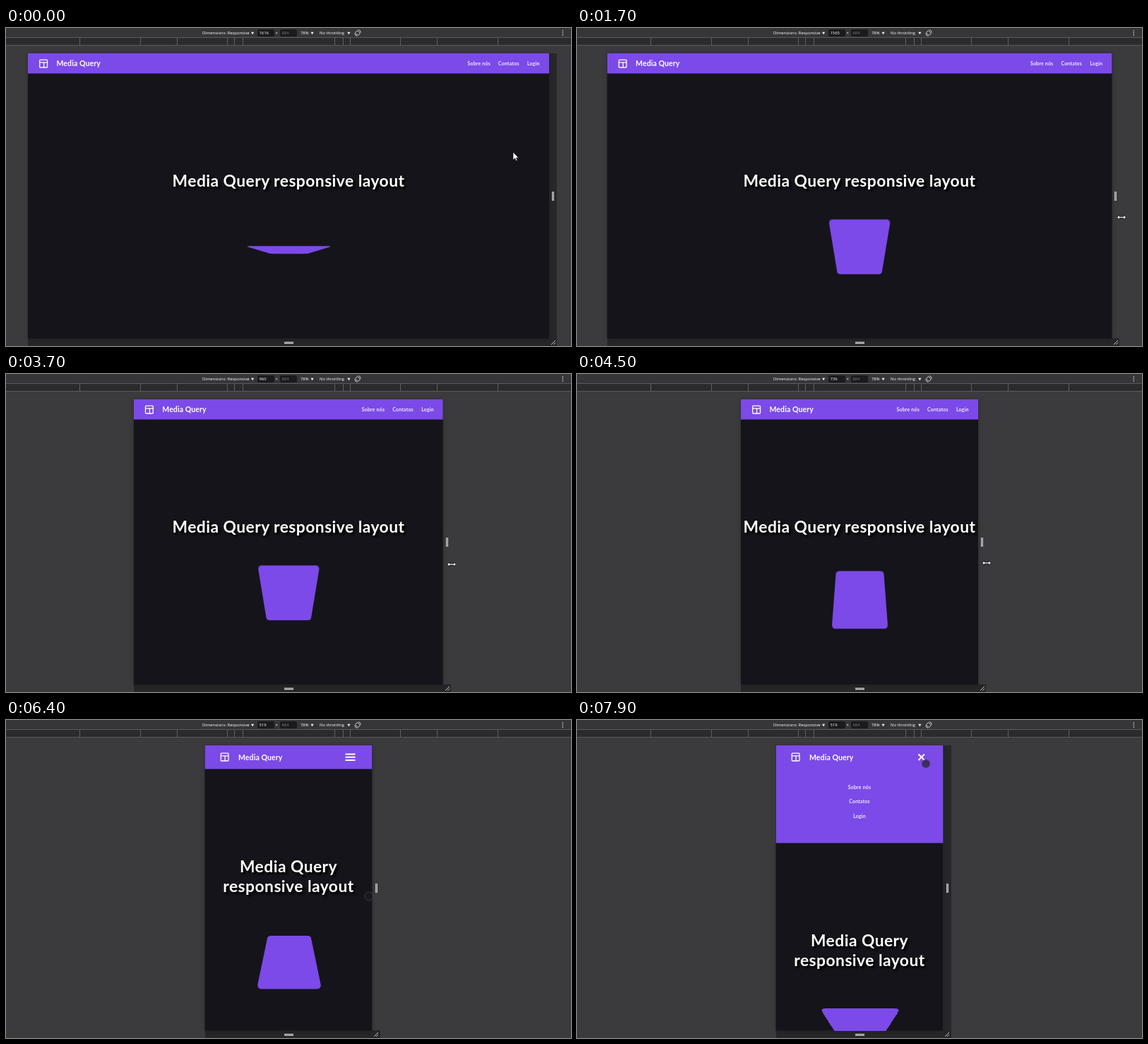
Write an HTML page that moves like this. It is 800 by 451 pixels and loops after 8000 ms.

```html
<!DOCTYPE html>
<html lang="en">
<head>
<meta charset="utf-8">
<title>Responsive layout</title>
<style>
html, body { margin: 0; width: 100%; height: 100%; overflow: hidden; background: #3b3b3d; }
#stage { position: relative; width: 800px; height: 451px; overflow: hidden; color: #fff; font-family: Lato, sans-serif; }
#stage * { position: absolute; box-sizing: border-box; white-space: nowrap; }
#stage br { position: static; }
svg { overflow: visible; }
.bar { left: 0; top: 0; width: 800px; height: 14px; background: #363638; border-bottom: 1px solid #5a5a5d;
  font: 500 5.9px/14px "Open Sans", sans-serif; }
.box { top: 2px; width: 24px; height: 10px; border-radius: 2px; background: #1a1a1c; line-height: 10px; padding-left: 2.5px; }
.presets { left: 0; top: 14px; width: 800px; height: 11px; background: #2b2b2d; border-bottom: 1px solid #5a5a5d; }
.presets i { top: 0; width: 1px; height: 10px; background: #606063; }
#page { left: 0; top: 0; height: 405px; overflow: hidden; background: #15141a; }
#shade { left: 0; top: 0; height: 405px; box-shadow: 0 0 6px rgba(0,0,0,.22); }
#head { left: 0; top: 0; width: 100%; background: #7c4ae8; }
#name { font-weight: 700; font-size: 10.5px; letter-spacing: .1px; line-height: 14px; }
.link { font-size: 7px; font-weight: 600; letter-spacing: .2px; line-height: 10px; }
h1 { margin: 0; left: 50%; transform: translate(-50%, -50%); text-align: center; font-weight: 700;
  font-size: 22.8px; letter-spacing: .46px; line-height: 27.5px; text-shadow: 3px 3px 3px #000; }
#plane { left: 50%; width: 73px; height: 83px; margin: -41.5px 0 0 -36px; border-radius: 4.8px; background: #7c4ae8; }
#bottom { top: 440px; height: 11px; background: #262628; }
#side { top: 36px; width: 11px; height: 404px; }
#grip { top: 232px; width: 3px; height: 13px; background: #77777a; border: solid #c8c8ca; border-width: 0 1px; }
#hgrip { left: 394px; top: 445px; width: 13px; height: 3px; background: #77777a; border: solid #c8c8ca; border-width: 1px 0; }
</style>
</head>
<body>
<div id="stage">
  <div class="bar">
    <span style="left:278px">Dimensions: Responsive</span>
    <span class="box" id="size" style="left:356px"></span>
    <span style="left:381.5px">×</span>
    <span class="box" style="left:388px;color:#77777a">884</span>
    <span style="left:417px">78%</span>
    <span style="left:444px">No throttling</span>
    <svg width="800" height="14" fill="#f0f0f2">
      <path d="M347 5.8h4.2l-2.1 3.4zM431.5 5.8h4.2l-2.1 3.4zM483.3 5.8h4.2l-2.1 3.4z"/>
      <g fill="none" stroke="#e0e0e2" stroke-width=".9">
        <rect x="495.6" y="4.2" width="4.6" height="5.6" rx=".8" transform="rotate(-45 498 7)"/>
        <path d="M493.8 7.5a4.4 4.4 0 0 0 3.6 4M502.3 6.5a4.4 4.4 0 0 0 -3.6 -4"/>
      </g>
      <circle cx="788.3" cy="4" r=".8"/><circle cx="788.3" cy="7" r=".8"/><circle cx="788.3" cy="10" r=".8"/>
    </svg>
  </div>
  <div class="presets" id="presets"></div>
  <div id="bottom"></div>
  <div id="side"></div>
  <div id="shade"></div>
  <div id="page">
    <div id="head">
      <svg id="icon" width="12" height="12" fill="none" stroke="#fff" stroke-width="1.3">
        <rect x=".7" y=".7" width="10.8" height="10.8" rx="1"/><path d="M.7 4.3h10.8M6.6 4.3v7"/>
      </svg>
      <span id="name">Media Query</span>
      <span class="link">Sobre nós</span>
      <span class="link">Contatos</span>
      <span class="link">Login</span>
      <svg id="toggle" width="14" height="11" style="top:11.5px" fill="none" stroke="#fff" stroke-width="2"><path/></svg>
    </div>
    <h1></h1>
    <div id="plane"></div>
  </div>
  <div id="grip"></div>
  <div id="hgrip"></div>
  <svg id="corner" width="8" height="8" style="top:442px" stroke="#c4c4c6"><path d="M1 7L7 1M4.2 7L7 4.2"/></svg>
  <svg id="cursor" width="1" height="1">
    <path d="M0 -1V10.2L2.6 7.8L4.3 11.4L6 10.6L4.4 7.2H7.8Z" fill="#fff" stroke="#000" stroke-width=".6"/>
    <path d="M-6.3 0L-3 -3.1V-1H3V-3.1L6.3 0L3 3.1V1H-3V3.1Z" fill="#fff" stroke="#000" stroke-width=".7"/>
    <circle r="6" fill="rgba(28,28,30,.65)" stroke="rgba(100,100,104,.5)"/>
  </svg>
</div>
<script>
const $ = q => document.querySelector(q);
const px = v => v + 'px';
const place = (el, left, width) => {
  el.style.left = px(left);
  if (width !== undefined) el.style.width = px(width);
};
const links = document.querySelectorAll('.link'), pointers = $('#cursor').children;
const LOOP = 8000, SCALE = .22835;   // half a CSS pixel on the stage

// rows: time, value...
const HALF = [[0, 369], [1300, 369], [1700, 357.4], [1800, 354], [2600, 294.1], [2700, 288], [3600, 224],
  [3700, 219.2], [4500, 168], [5200, 140], [5450, 140], [6300, 118.5]];
const CURSOR = [[0, 718, 177], [300, 718, 177], [1000, 782, 266], [1300, 782.5, 268], [1700, 771, 268.5],
  [2600, 706, 271.5], [3700, 631, 270], [4500, 580, 268], [5300, 556.5, 266], [5450, 556.5, 266],
  [6300, 535, 262], [6400, 514, 250], [7100, 494, 62]];

function at(rows, t) {
  const i = rows.findIndex(r => r[0] > t);
  if (i < 0) return rows[rows.length - 1].slice(1);
  const a = rows[i - 1], b = rows[i], k = (t - a[0]) / (b[0] - a[0]);
  return a.slice(1).map((v, j) => v + (b[j + 1] - v) * k);
}

for (const d of [65, 77, 87, 158, 210, 296])
  for (const x of [400 - d, 400 + d]) {
    const line = document.createElement('i');
    place(line, x);
    $('#presets').append(line);
  }

function drawPage(half, open) {
  const mobile = half < 600 * SCALE, wrapped = half < 166;
  const shift = (mobile ? 5.25 : 0) + (open ? 104.7 : 0);
  const mid = mobile ? 17 : 14.5;
  for (const el of [$('#page'), $('#shade')]) {
    el.style.width = px(half * 2);
    el.style.transform = `translate(${400 - half}px, 35.5px)`;
  }
  $('#head').style.height = px(open ? 139 : mobile ? 34 : 29);
  place($('#icon'), mobile ? 21.8 : 15.5);
  $('#icon').style.top = px(mid - 6);
  place($('#name'), mobile ? 47.5 : 40.5);
  $('#name').style.top = px(mid - 7.2);
  links.forEach((el, i) => {
    el.style.display = mobile && !open ? 'none' : '';
    el.style.left = px(open ? half : half * 2 - [115.5, 72, 31][i]);
    el.style.top = px(open ? 54 + 20.3 * i : 9.3);
    el.style.transform = open ? 'translateX(-50%)' : '';
  });
  $('#toggle').style.display = mobile ? '' : 'none';
  place($('#toggle'), half * 2 - 38);
  $('#toggle path').setAttribute('d', open ? 'M3 1L11.5 9.5M11.5 1L3 9.5' : 'M0 1h14M0 5.3h14M0 9.6h14');
  const text = 'Media Query' + (wrapped ? '<br>' : ' ') + 'responsive layout';
  if ($('h1').innerHTML !== text) $('h1').innerHTML = text;
  $('h1').style.top = px(181.2 + shift);
  $('#plane').style.top = px(281.3 + shift + (wrapped ? 13.75 : 0));
}

function drawPlane(t) {
  const phase = (.465 + Math.max(0, t / 1000 - .03)) % 2;
  const x = -180 * Math.min(phase, 1), y = -180 * Math.max(phase - 1, 0);
  $('#plane').style.transform = `perspective(100px) rotateX(${x}deg) rotateY(${y}deg)`;
}

function drawFrame(half, t) {
  const right = 400 + half;
  $('#size').textContent = Math.round(half / SCALE);
  place($('#bottom'), 400 - half, half * 2 + 11);
  place($('#side'), right);
  $('#side').style.background = t < 1100 || t > 6400 ? '#28282a' : '#3b3b3d';
  place($('#grip'), right + 4);
  place($('#corner'), right + 1.5);
}

function drawCursor(t) {
  const [x, y] = at(CURSOR, t), kind = t < 1000 ? 0 : t < 6400 ? 1 : 2;
  $('#cursor').style.transform = `translate(${x}px, ${y}px)`;
  [...pointers].forEach((p, i) => p.style.display = i === kind ? '' : 'none');
}

function draw(now) {
  const t = Math.floor(now % LOOP / 100) * 100;
  const lag = t > 1800 && t < 3000 ? 45 : 0;   // the page trails a fast drag
  drawPage(at(HALF, t - lag)[0], t >= 7500);
  drawFrame(at(HALF, t)[0], t);
  drawPlane(t);
  drawCursor(t);
}

const start = performance.now();
function tick() {
  draw(performance.now() - start);
  requestAnimationFrame(tick);
}
tick();
</script>
</body>
</html>
```
